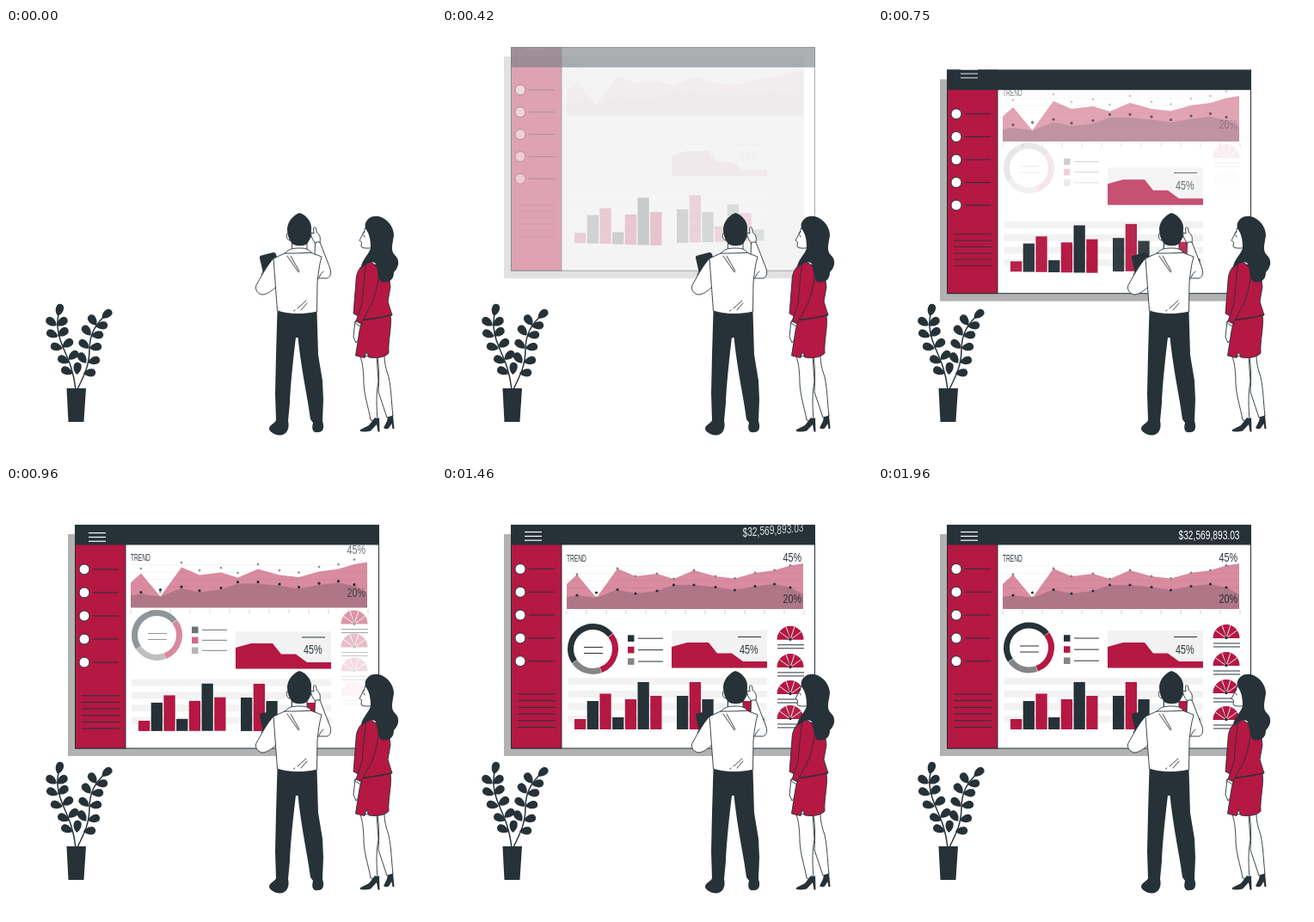
An HTML page for the animation above (2 s loop, 500 by 500 pixels).

```html
<!DOCTYPE html>
<html lang="en">
<head>
<meta charset="utf-8">
<title>Dashboard presentation</title>
<style>
html, body { margin: 0; width: 100%; height: 100%; overflow: hidden; background: #fff; }
svg { display: block; width: 100vw; height: 100vh; }
text { font-family: "Liberation Sans", Arial, sans-serif; }
.dark { fill: #263238; }
.red { fill: #b41843; }
.skin { fill: #fff; stroke: #263238; stroke-width: .9; stroke-linejoin: round; stroke-linecap: round; }
.suit { fill: #b41843; stroke: #263238; stroke-width: .9; stroke-linejoin: round; }
.line { fill: none; stroke: #263238; stroke-width: .9; stroke-linecap: round; stroke-linejoin: round; }
</style>
</head>
<body>
<svg viewBox="0 0 500 500">
  <g id="board"></g>
  <g id="plant">
    <path class="dark" d="M70.500 419H93L90.500 458H72.500Z"/>
    <path class="line" style="stroke-width:1.5" d="M81 420C78 394 70 381 65 368C60 355 58 342 62 330M83 420C92 402 97 391 97 374C97 357 105 343 116 334"/>
  </g>
  <g id="man">
    <path class="dark" d="M297 264.500L310.500 261Q313 260.500 314 263L316 270L303 289L299 285L295 267.500Q294.500 265 297 264.500Z"/>
    <path class="skin" d="M328 238C325 239 326 247 330 247M353 238C356 238 355 246 351 247"/>
    <path class="skin" d="M332.500 247V258C338 260 345 260 350 258V247Z"/>
    <path class="skin" d="M359 265L359.500 250C356 245 354 241 355 238L358 239L357.500 233C358 231 360 231.500 360.500 233L361.500 238C365 240 366 244 365 249L377 280C379 287 376 292 371 291L362 291Z"/>
    <path class="skin" d="M312 267C303 276 297 289 291 299C289 304 293 310 299 310C305 309 310 305 315 300Z"/>
    <path class="skin" d="M326 261L311 268L312 281L315.500 329C330 334 350 333 361.500 330L362 296C363 287 364 276 367 266L354 261Z"/>
    <path class="skin" d="M324.500 262C328 258 331 256 341 256C348 256 352 257 355 261C345 262 333 262 324.500 262Z"/>
    <path class="line" d="M327 265L340 284M331 265L341 283M334.500 329L336 328M339 326L349 317M343 328L350 320M359 250Q362 248 365 249M364 290Q366 285 369 283M297 287L300 281"/>
    <path class="dark" d="M327 233C328 224 334 218 341 215C349 217 355 225 355 232C355 240 354 246 350 251C346 254 337 254 333 251C329 247 327 240 327 233Z"/>
    <path class="dark" d="M315.500 329C330 334 350 333 361.500 330L363 380L368 410L369 432L368 457C370 463 370 470 363 470C357 471 355 467 357 459L354 455C351 430 344 402 339.500 360H337C335 376 331 412 330 436L328 457C330 465 327 473 319 473.500C313 474 306 469 306 466C306 461 313 460 314 456L313 425L314 380Z"/>
  </g>
  <g id="woman">
    <path class="skin" d="M412 382C415 390 416 402 416 414C417 430 422 443 424 456L432 457C431 441 430 427 433 411L431 382Z"/>
    <path class="skin" d="M432 382C434 396 434 409 433 423L443 453L450 451C448 434 448 420 445 406C442 397 440 390 440 382Z"/>
    <path class="skin" d="M406 341L404 359L407 366L411 361L413 345Z"/>
    <path class="dark" d="M412 467L422 462L429 453Q432 455 434 453L434.500 469.500H432.500L431 461L424 468.500Q417 470 412 469ZM439 465L443 457L444 452Q447 453 450 450L451.500 466H449.500L448.500 460L445 465.500Q441 467 439 465Z"/>
    <path class="suit" d="M414 339L447 334C449 347 444 364 445 378C440 384 428 384 422 383L419 376L417 383.500L406.500 381L411 352Z"/>
    <path class="suit" d="M419 273C411 277 407 285 407 294L404 332L417 339L449 334L444 318L447 301L444 279Z"/>
    <path class="suit" d="M419 273C428 269 434 280 433 292C430 306 429 314 422 327L412 345L407 341L414 320L417 287Z"/>
    <path class="line" d="M416 340C428 338 440 337 449 333"/>
    <path class="skin" d="M407 341L413 344L412 347L406 343Z"/>
    <path class="skin" d="M418 232L416 238L411 247L413.500 249L413 254Q414 256.500 423 256L429 252V230Z"/>
    <path class="line" d="M414.500 239L417 237M416 241L417 243"/>
    <path class="dark" d="M417.500 229C419 221 426 218 433 219C443 221 451 231 451 241C450 250 446 259 453 265C458 270 457 278 451 284C451 293 445 297 436 295C431 289 434 281 429 273C423 270 418 276 413 279C413 270 421 265 424 256C424 247 423 240 418 233Z"/>
  </g>
</svg>
<script>
const DARK = '#263238', RED = '#b41843', GRAY = '#858487', PALE = '#f2f2f2';
const FPS = 24, LOOP = 2000, SPAN = 950, DROP = 30;
const board = document.getElementById('board');
const items = [];

const make = (parent, markup) => {
  const g = document.createElementNS('http://www.w3.org/2000/svg', 'g');
  g.innerHTML = markup;
  return parent.appendChild(g);
};
// lead: how much earlier the fade runs than the drop
const item = (delay, markup, lead = 0) => items.push({ g: make(board, markup), delay, lead });

const rect = (x, y, r, b, fill, extra = '') =>
  `<rect x="${x}" y="${y}" width="${r - x}" height="${b - y}" fill="${fill}" ${extra}/>`;
const rule = (x1, x2, y, color = DARK, w = 1) =>
  `<path d="M${x1} ${y}H${x2}" stroke="${color}" stroke-width="${w}"/>`;
const dot = (x, y, r, fill, extra = '') => `<circle cx="${x}" cy="${y}" r="${r}" fill="${fill}" ${extra}/>`;
const label = (x, y, size, str, fill = DARK, k = .72) =>
  `<text transform="translate(${x} ${y}) scale(${k} 1)" font-size="${size}" fill="${fill}">${str}</text>`;
const polar = (cx, cy, r, deg) => {
  const a = deg * Math.PI / 180;
  return `${(cx + r * Math.sin(a)).toFixed(2)} ${(cy - r * Math.cos(a)).toFixed(2)}`;
};

// Window frame
item(0, rect(72, 56, 421, 314, '#b2b2b2'));
item(0, rect(80.5, 45.5, 433.5, 305, '#fff', `stroke="${DARK}"`));
item(0, rect(80.5, 45.5, 139, 305, RED, `stroke="${DARK}"`));
item(0, rect(80.5, 45.5, 433.5, 68, DARK, `stroke="${DARK}"`));

// Sidebar
for (let i = 0; i < 5; i++) {
  const y = 96.5 + 26.8 * i;
  item(25 + 14 * i, dot(91, y, 6, '#fff', `stroke="${DARK}"`) + rule(101, 131, y));
}
for (let i = 0; i < 6; i++) item(208 + 7 * i, rule(88, 132, 242 + 7.7 * i));
item(265, [53.5, 58.4, 63.2].map(y => rule(96, 116, y, '#fff', 1.2)).join(''));

// Bar chart
item(100, [223, 238, 252.5, 267].map(y => rect(146, y, 378, y + 8, PALE)).join(''));
[271, 250, 241.5, 269, 248, 228, 244].forEach((top, i) => {
  const x = 154 + 14.7 * i;
  item(150 - 7 * i, rect(x, top, x + 13.3, 283, i % 2 ? DARK : RED));
});
[244, 228, 248, 265, 240, 250, 270].forEach((top, i) => {
  const x = 273 + 14.7 * i;
  item(155 + 7 * i, rect(x, top, x + 13.3, 283, i % 2 ? RED : DARK));
});

// Small area chart
item(272, rect(267, 168, 378, 212, PALE) +
  `<path class="red" d="M267 187L285 182H310L320 194.500H337L350 204H378V211.500H267Z"/>`);
item(295, rule(344, 371, 175.5) + label(346, 195, 15, '45%'));

// Trend chart
const xs = [157, 179.5, 204, 225, 250, 269.5, 293, 318, 340.5, 364, 386.5, 405];
const high = [103, 130, 96, 105, 102, 108, 98, 105, 107.5, 101, 98, 92.5];
const low = [127, 124, 120.5, 125, 122, 115, 115, 117.5, 121, 116.5, 114, 118];
const area = (first, ys, last) =>
  `M145 143V${first}` + xs.map((x, i) => `L${x} ${ys[i]}`).join('') + `L420 ${last}V143Z`;
const lowEdge = low.map((y, i) => i === 1 ? 130 : y);
const ticks = Array.from({ length: 13 }, (_, i) => `M${145 + 23 * i} 144.500v5`).join('');
item(355, [93, 101.5, 110, 118.5].map(y => rule(145, 420, y, '#efefef', .7)).join('') +
  `<path class="red" fill-opacity=".5" d="${area(114, high, 90)}"/>` +
  `<path class="dark" fill-opacity=".23" d="${area(129, lowEdge, 126)}"/>` +
  `<path d="${ticks}" stroke="#d9c3ca" stroke-width=".8"/>`, 100);
item(403, xs.map((x, i) => dot(x, low[i], 1.6, DARK)).join(''), 80);
item(471, xs.map((x, i) => dot(x, high[i], 1.4, GRAY)).join(''), 60);
item(322, label(145, 87.5, 10, 'TREND', DARK, .66));
item(471, label(396.5, 136, 15, '20%'));
item(510, label(396.5, 88, 15, '45%'));

// Donut and its legend
const ring = (from, to, color) =>
  `<path d="M${polar(175.5, 188, 26, from)}A26 26 0 ${to - from > 180 ? 1 : 0} 1 ${polar(175.5, 188, 26, to)}" fill="none" stroke="${color}" stroke-width="7"/>`;
item(588, ring(236, 412, DARK) + ring(53, 159, RED) + ring(160, 235, GRAY) +
  rule(165, 187, 186) + rule(165, 187, 193));
[DARK, RED, GRAY].forEach((c, i) => {
  const y = 177 + 13.1 * i;
  item(515 + 17 * i, rect(216, y - 3.8, 223.5, y + 3.8, c) + rule(228, 257, y));
});

// Gauges
[177, 209, 241, 272].forEach((y, i) => {
  const spokes = [-54, -18, 18, 54].map(a => `M405 ${y}L${polar(405, y, 15.5, a)}`).join('');
  item(615 + 77 * i, `<path class="red" d="M389.500 ${y}A15.500 16 0 0 1 420.500 ${y}Z"/>` +
    `<path d="${spokes}" stroke="#fff" stroke-width=".9"/>` +
    `<path d="M405 ${y - 1}l-4 -8" stroke="${DARK}" stroke-width=".7"/>` + dot(405, y - .5, 1.8, DARK) +
    rule(390, 421, y + 6) + rule(390, 421, y + 10));
});

// Amount, one glyph after another
let pen = 349.5;
[...'$32,569,893.03'].forEach((ch, i) => {
  item(890 + 8 * i, label(pen, 61.5, 14.6, ch, '#fff', .7));
  pen += (/[.,]/.test(ch) ? .278 : .556) * 14.6 * .7;
});

// Plant leaves: x, y, angle
const leaves = [
  [62, 328, -75], [53, 342, 215], [65, 342, -35], [54, 356, 205], [66, 354, -35], [59, 371, 195],
  [71.5, 367, -35], [67, 386, 205], [78, 381, -40], [71, 399, 205], [83, 396, -85],
  [117, 333, -40], [101, 340, 235], [111, 346, -5], [94, 352, 230], [106, 357, -5], [91, 368, 220],
  [104, 371, -10], [89, 384, 235], [102, 387, -15], [97, 401, -5]
];
make(document.getElementById('plant'), leaves.map(([x, y, a]) =>
  `<path class="dark" transform="translate(${x} ${y}) rotate(${a})" d="M-7 0C-4 -4 1 -5.500 5 -4C8 -2 8 2 5 4C1 5.500 -4 4 -7 0Z"/>`).join(''));

// Cubic bezier (.36, -.01, .5, 1.38)
const cubic = (a, b, s) => 3 * (1 - s) ** 2 * s * a + 3 * (1 - s) * s * s * b + s ** 3;
function ease(ms) {
  const x = ms / SPAN;
  if (x <= 0) return 0;
  if (x >= 1) return 1;
  let lo = 0, hi = 1;
  for (let i = 0; i < 22; i++) {
    const mid = (lo + hi) / 2;
    if (cubic(.36, .5, mid) < x) lo = mid; else hi = mid;
  }
  return cubic(-.01, 1.38, lo);
}

function pose(g, p, fade) {
  g.setAttribute('transform', `translate(0 ${(DROP * (p - 1)).toFixed(2)})`);
  g.setAttribute('opacity', Math.min(1, Math.max(0, fade)).toFixed(3));
}

function draw(ms) {
  const step = Math.floor(ms * FPS / 1000 + .06);
  const t = step < 5 ? 0 : step * 1000 / FPS;
  const p = ease(t);
  pose(board, p, p);
  for (const { g, delay, lead } of items) pose(g, ease(t - delay), ease(t - delay + lead));
}

const start = performance.now();
function tick() {
  draw((performance.now() - start) % LOOP);
  requestAnimationFrame(tick);
}
draw(0);
requestAnimationFrame(tick);
</script>
</body>
</html>
```
